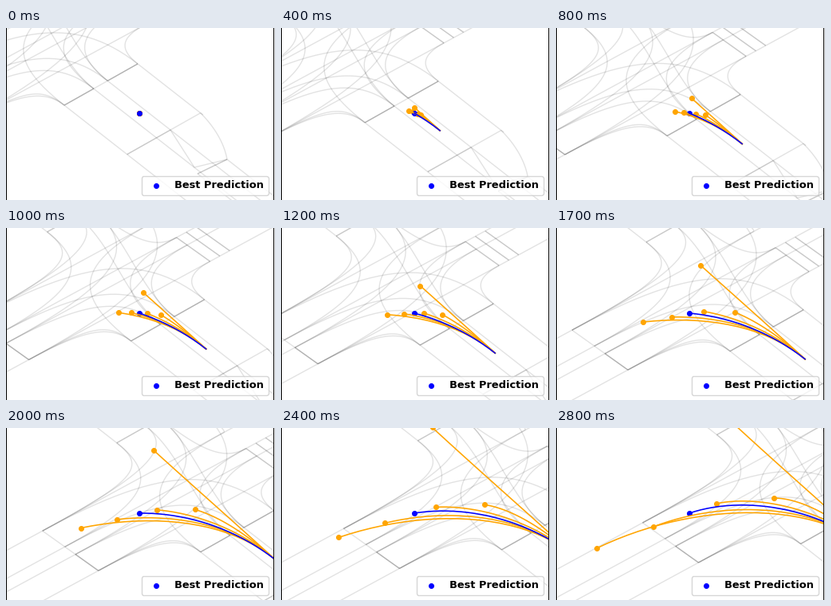
Animation of 337 by 216 pixels, one loop 2900 ms. Source, as a matplotlib script:

```python
import numpy as np
import matplotlib.pyplot as plt
from matplotlib.animation import FuncAnimation
from matplotlib.collections import LineCollection

W, H = 337, 216
VIEW_W = 335
FRAMES = 29
PX = 0.72  # points per pixel at 100 dpi

# Road directions, and where the lane edges lie across a road
EAST = np.array([0.878, -0.478])
SOUTH = np.array([0.787, 0.617])
LANES = np.array([0, 0.4, 0.59, 1])[:, None]


def bezier(p0, p1, p2, p3, n=30):
    s = np.linspace(0, 1, n)[:, None]
    a, b, c, d = (np.array(p, float) for p in (p0, p1, p2, p3))
    return ((1 - s)**3 * a + 3 * s * (1 - s)**2 * b
            + 3 * s**2 * (1 - s) * c + s**3 * d)


def stop_line(start, end):
    """Lane edge points along one stop line."""
    return np.array(start) + LANES * np.subtract(end, start)


def through(p, q, d):
    """Lane that goes straight on along d."""
    reach = np.hypot(*(q - p)) / 3 * d
    return bezier(p, p + reach, q - reach, q)


def turn(p, dp, q, dq, f=0.75):
    """Lane that bends at the point where both headings meet."""
    m, k = np.linalg.solve(np.column_stack([dp, -dq]), q - p)
    return bezier(p, p + f * m * dp, q + f * k * dq, q)


def ray(p, d, length=400):
    return np.array([p, p + length * d])


west = stop_line((-125, 70.5), (-55, 120.5))
east = stop_line((102, -53), (172, -3))
north = stop_line((-32, -40), (60, -92))
south = stop_line((73, 97), (165, 45))


def build_map():
    lines = [turn(west[0], EAST, north[0], SOUTH, 0.85),
             turn(west[3], EAST, south[0], -SOUTH, 0.85)]
    for i in range(4):
        lines += [through(west[i], east[i], EAST),
                  ray(west[i], -EAST), ray(east[i], EAST)]
    for i in (0, 1):
        lines += [turn(west[2 + i], EAST, south[1 - i], -SOUTH),
                  turn(west[2 + i], EAST, north[2 + i], SOUTH),
                  turn(west[i], EAST, north[1 - i], SOUTH),
                  turn(west[i], EAST, south[3 - i], -SOUTH),
                  turn(east[2 + i], -EAST, south[2 + i], -SOUTH, 0.7),
                  turn(east[i], -EAST, south[i], -SOUTH),
                  turn(east[i], -EAST, north[3 - i], SOUTH),
                  through(north[1 + i], south[1 + i], SOUTH),
                  ray(north[3 * i], -SOUTH)]

    # southern arm with its tapering lane
    far = south + 100 * SOUTH
    tip, inner = np.array([277, 165]), np.array([240, 183])
    lines += [ray(p, SOUTH) for p in south[:3]]
    lines += [ray(south[3], SOUTH, 104), far[[0, 3]], far[[0, 2]],
              bezier(far[3], far[3] + (16, 16), tip - (4, 22), tip),
              np.array([far[2], (236, 175), tip]),
              ray(tip, SOUTH), ray(inner, SOUTH)]
    lines += [np.array([tip, inner])] * 2

    # stop lines: overlapping edges make the darker ones
    lines += [west[[0, 3]], south[[0, 3]], north[[0, 3]], north[[0, 1]]]
    lines += [west[2:], south[:2], south[2:], east[1:]] * 2
    for gap in (14, 28):
        lines += [east[1:] + gap * EAST] * 2
    return lines


# Travelled paths in map pixels: control points after the shared start
START = (167, 107)
ENDINGS = [
    [(92, 38.5), (21, -23), (-41, -82)],
    [(86, 38), (-67, 46.5), (-182.5, 102.5)],
    [(92, 43.5), (-26, 42.5), (-111.5, 75.5)],
    [(104, 52), (17.5, 35.5), (-32.5, 46.5)],
    [(109, 55), (66.5, 39.5), (39.5, 39.5)],
    [(95, 50), (0, 36), (-66.5, 58.5)],  # best one, followed by the camera
]
paths = [bezier(START, *end, n=FRAMES) for end in ENDINGS]
best = paths[-1]

fig = plt.figure(figsize=(W / 100, H / 100), dpi=100, facecolor="white")
ax = fig.add_axes([0, 0, VIEW_W / W, 1])
ax.set_xticks([])
ax.set_yticks([])
ax.spines[["top", "bottom"]].set_visible(False)
ax.spines[["left", "right"]].set_linewidth(PX)
ax.add_collection(LineCollection(build_map(), colors="black", alpha=0.115,
                                 linewidths=1.4 * PX), autolim=False)

trails, heads = [], []
for path in paths:
    color = "blue" if path is best else "orange"
    trails.append(ax.plot([], [], color=color, lw=1.6 * PX, zorder=4)[0])
    heads.append(ax.scatter(*START, s=(6 * PX)**2, color=color, lw=PX, zorder=3,
                            label="Best Prediction"))
ax.legend(handles=heads[-1:], loc="lower right",
          prop={"family": "DejaVu Sans", "weight": "bold", "size": 13 * PX})


def update(n):
    dx, dy = best[n] - START
    ax.set_xlim(dx, VIEW_W + dx)
    ax.set_ylim(H + dy, dy)
    for path, trail, head in zip(paths, trails, heads):
        trail.set_data(*path[:n + 1].T)
        head.set_offsets(path[n])
    return trails + heads


anim = FuncAnimation(fig, update, frames=FRAMES, interval=100, repeat=True,
                     repeat_delay=0, blit=False)
plt.show()
```
